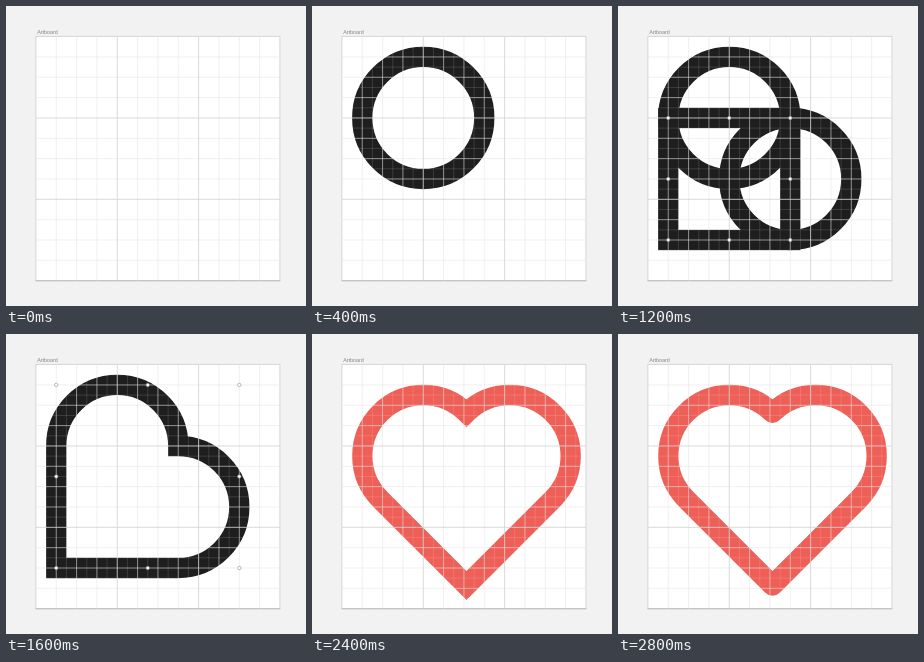
An HTML page for the animation above (3.2 s loop, 300x300 px).

```html
<!DOCTYPE html>
<html lang="en">
<head>
<meta charset="utf-8">
<title>Heart construction</title>
<style>
  html, body { margin: 0; width: 100%; height: 100%; overflow: hidden; background: #f2f2f2; }
  svg { display: block; width: 100vw; height: 100vh; }
  text { font: 5.35px "Liberation Sans", Arial, sans-serif; fill: #858585; }
</style>
</head>
<body>
<svg id="stage" viewBox="0 0 300 300">
  <text x="31.2" y="27.5">Artboard</text>
  <rect x="29.9" y="30.4" width="244" height="244.2" fill="#fff" stroke="#d6d6d6"/>
  <path d="M29.5 274.8H274.3" stroke="#bcbcbc"/>
  <g id="shapes" fill="none"></g>
  <g id="grid"></g>
  <g id="handles" fill="#fff" stroke="#8f8f8f" stroke-width=".6"></g>
</svg>
<script>
const NS = 'http://www.w3.org/2000/svg';
const STEP = 400, LEFT = 29.9, TOP = 30.6, UNIT = 20.34, SIZE = 12 * UNIT;
const BLACK = '#1e1e1e', RED = '#ee5f57';
const px = n => LEFT + n * UNIT;
const py = n => TOP + n * UNIT;
const layer = id => document.getElementById(id);

function add(parent, tag, attrs) {
  const el = document.createElementNS(NS, tag);
  for (const key in attrs) el.setAttribute(key, attrs[key]);
  parent.append(el);
  return el;
}

// Grid lines from first to last, given in units
function lines(first, gap, stroke, skip) {
  let d = '';
  for (let n = first; n < 12; n += gap) {
    if (skip && n % skip === 0) continue;
    d += `M${px(n)} ${TOP}v${SIZE}M${LEFT} ${py(n)}h${SIZE}`;
  }
  add(layer('grid'), 'path', { d, stroke });
}
lines(0.5, 1, 'rgba(255,255,255,.13)');
lines(1, 1, 'rgba(230,230,230,.58)', 4);
lines(4, 4, 'rgba(212,212,212,.85)');

const shapes = layer('shapes');
shapes.setAttribute('stroke-width', UNIT);

const r = 3 * UNIT;
const circle = n => add(shapes, 'circle', { cx: px(n), cy: py(n), r });
const first = circle(4);
const second = circle(7);
const square = add(shapes, 'rect', {
  x: px(1), y: py(4), width: 6 * UNIT, height: 6 * UNIT
});
const heart = add(shapes, 'path', {
  d: `M${px(1)} ${py(10)}V${py(4)}A${r} ${r} 0 0 1 ${px(7)} ${py(4)}` +
     `A${r} ${r} 0 0 1 ${px(7)} ${py(10)}Z`
});
const upright = `translate(154.5 251.5) rotate(-45) translate(${-px(1)} ${-py(10)})`;

// Selection handles around a box given in grid units
function selection(x, y, size) {
  const group = add(layer('handles'), 'g', {});
  for (let i = 0; i < 9; i++) {
    if (i === 4) continue;
    add(group, 'circle', {
      cx: px(x + (i % 3) * size / 2),
      cy: py(y + Math.floor(i / 3) * size / 2),
      r: 1.7
    });
  }
  return group;
}
const circleBox = selection(4, 4, 6);
const squareBox = selection(1, 4, 6);
const heartBox = selection(1, 1, 9);

const show = (el, on) => el.setAttribute('display', on ? 'inline' : 'none');

function draw(time) {
  const step = Math.floor(time / STEP) % 8;
  show(first, step >= 1 && step <= 3);
  show(second, step === 2 || step === 3);
  show(square, step === 3);
  show(heart, step >= 4);
  show(circleBox, step === 2);
  show(squareBox, step === 3);
  show(heartBox, step === 4);
  heart.setAttribute('transform', step >= 5 ? upright : '');
  heart.setAttribute('stroke-linejoin', step === 7 ? 'round' : 'miter');
  shapes.setAttribute('stroke', step >= 6 ? RED : BLACK);
}

const start = performance.now();
function tick() {
  draw(performance.now() - start);
  requestAnimationFrame(tick);
}
tick();
</script>
</body>
</html>
```
